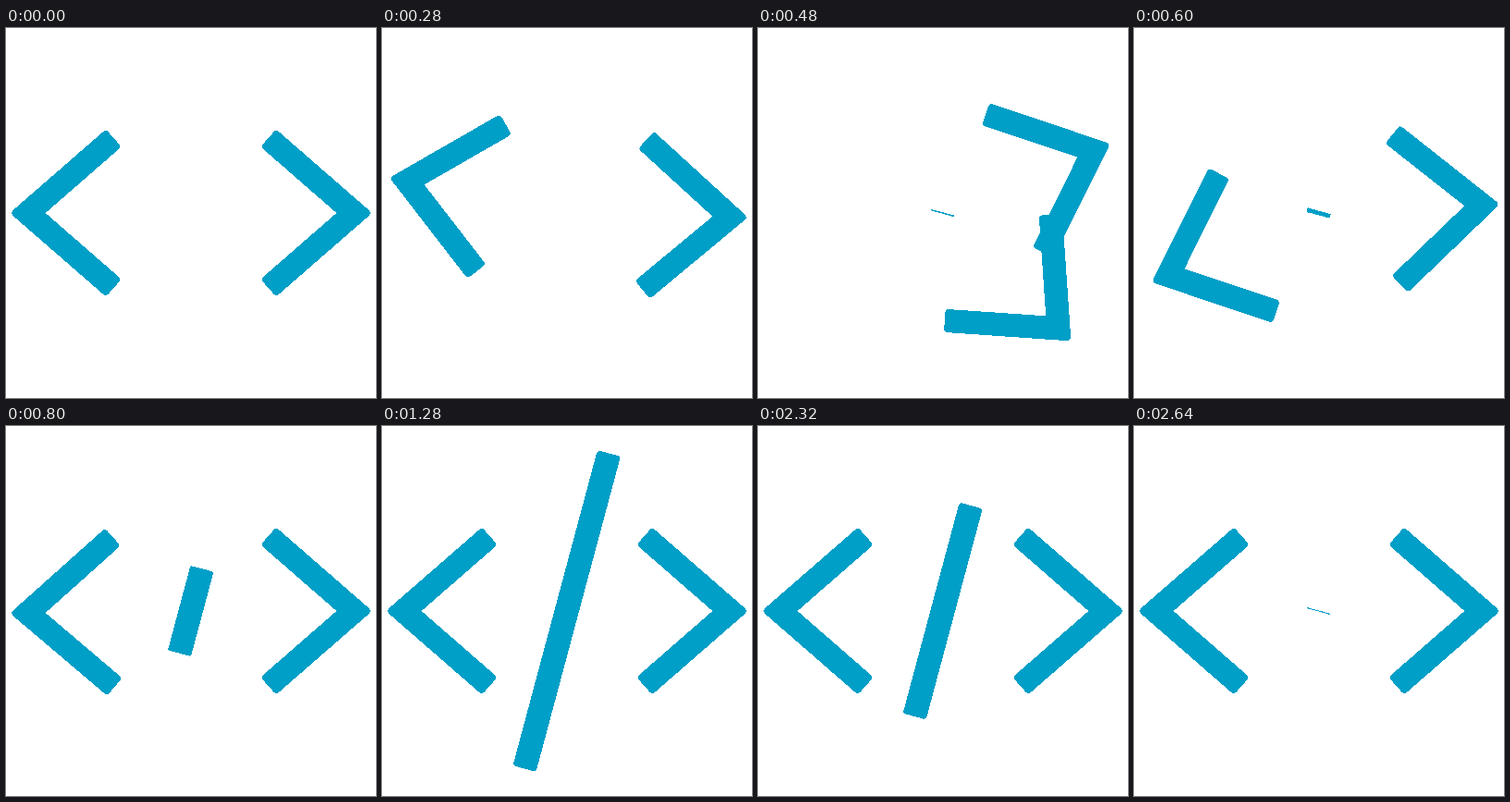
Write an HTML page with a canvas that moves like this. It is 400 by 400 pixels and loops after 2680 ms.

```html
<!DOCTYPE html>
<html lang="en">
<head>
<meta charset="utf-8">
<title>Code tag loop</title>
<style>
  html, body { margin: 0; width: 100%; height: 100%; overflow: hidden; background: #fff; }
  canvas { display: block; width: 400px; height: 400px; }
</style>
</head>
<body>
<canvas id="stage" width="400" height="400"></canvas>
<script>
const SIZE = 400;
const COLOR = '#009fc7';
const LOOP = 2680;
const STEP = 40;
const RADIUS = 3.5;
const MIN_ALPHA = 25;

const ctx = document.getElementById('stage').getContext('2d', { willReadFrequently: true });
ctx.fillStyle = COLOR;
const [red, green, blue] = COLOR.match(/\w\w/g).map(hex => parseInt(hex, 16));

const radians = degrees => degrees * Math.PI / 180;
const slash = { width: 25.2, length: 352.4, tilt: radians(15) };
const chevron = makeChevron(195.2, 24.5, 137, radians(41.05));

// Right-pointing bracket around the stage centre; the last corner is the sharp inner one.
function makeChevron(tip, width, arm, angle) {
  const c = Math.cos(angle), s = Math.sin(angle);
  const outer = [tip - arm * c, arm * s];
  const inner = [outer[0] - width * s, outer[1] - width * c];
  return [
    [inner[0], -inner[1]], [outer[0], -outer[1]], [tip, 0],
    outer, inner, [tip - width / s, 0]
  ];
}

function easeInOutExpo(t) {
  if (t <= 0) return 0;
  if (t >= 1) return 1;
  return t < 0.5 ? 2 ** (20 * t - 10) / 2 : 1 - 2 ** (10 - 20 * t) / 2;
}

function progress(time, start, duration) {
  return easeInOutExpo((time - start) / duration);
}

function drawChevron(angle) {
  ctx.save();
  ctx.translate(200, 200);
  ctx.rotate(angle);
  ctx.beginPath();
  ctx.moveTo(...chevron[5]);
  for (let i = 0; i < 5; i++) {
    ctx.arcTo(...chevron[i], ...chevron[i + 1], RADIUS);
  }
  ctx.closePath();
  ctx.fill();
  ctx.restore();
}

function drawSlash(scale) {
  if (scale < 0.001) return;
  const { width, length, tilt } = slash;
  ctx.save();
  ctx.translate(199.7, 200);
  ctx.rotate(tilt);
  ctx.scale(1, scale);
  ctx.beginPath();
  ctx.roundRect(-width / 2, -length / 2, width, length, RADIUS);
  ctx.fill();
  ctx.restore();
}

// Hard, unsmoothed edges: every touched pixel gets the full colour.
function hardenEdges() {
  const image = ctx.getImageData(0, 0, SIZE, SIZE);
  const { data } = image;
  for (let i = 0; i < data.length; i += 4) {
    const solid = data[i + 3] > MIN_ALPHA;
    data[i] = red;
    data[i + 1] = green;
    data[i + 2] = blue;
    data[i + 3] = solid ? 255 : 0;
  }
  ctx.putImageData(image, 0, 0);
}

function render(time) {
  ctx.clearRect(0, 0, SIZE, SIZE);
  // The brackets swap sides with a half turn each.
  drawChevron(Math.PI * (1 + progress(time, 0, 800)));
  drawChevron(Math.PI * progress(time, 120, 800));
  drawSlash(progress(time, 400, 880) - progress(time, 2000, 680));
  hardenEdges();
}

const start = performance.now();
function tick() {
  const time = (performance.now() - start) % LOOP;
  render(Math.floor(time / STEP) * STEP);
  requestAnimationFrame(tick);
}
tick();
</script>
</body>
</html>
```
